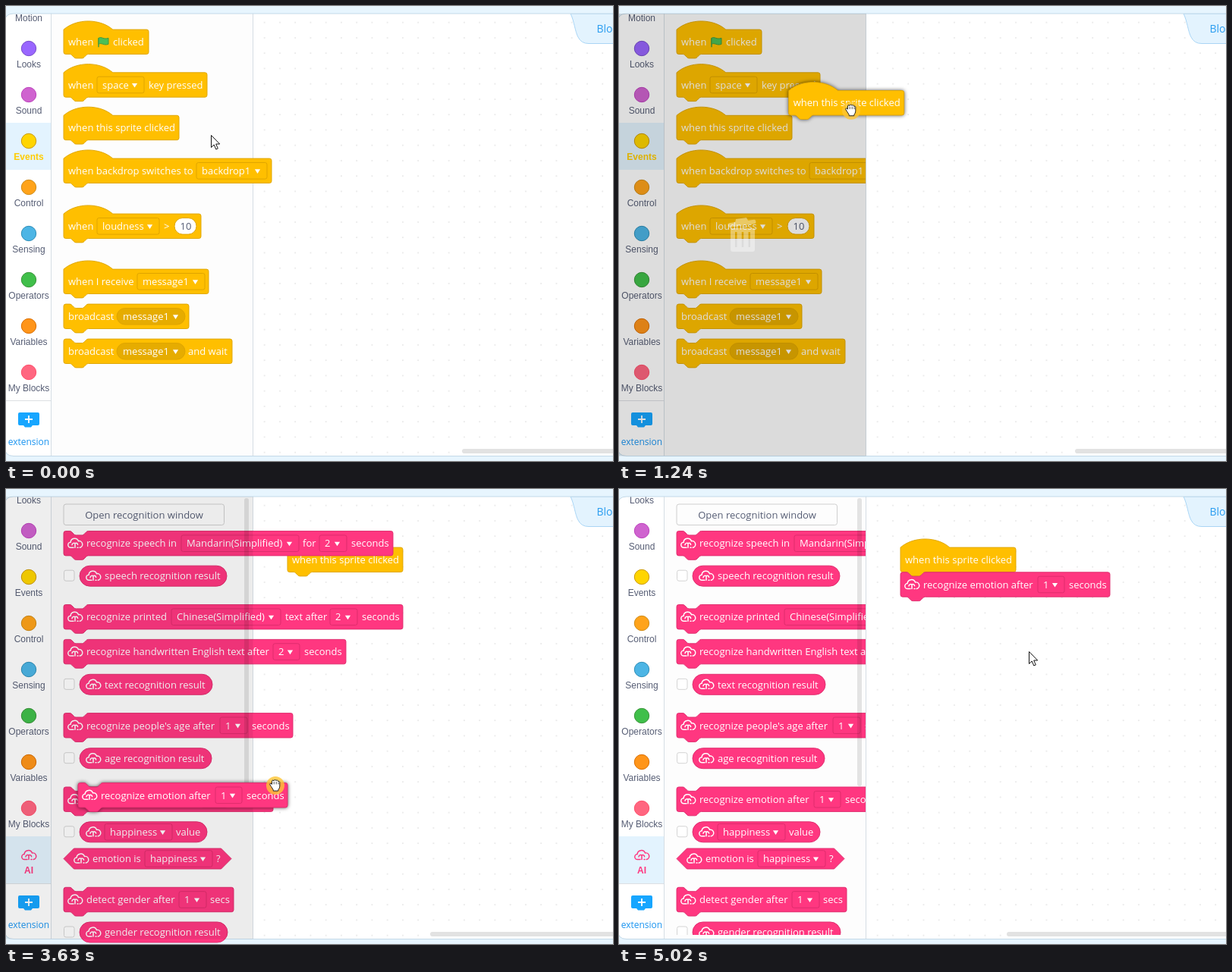
Animation of 800 by 600 pixels, one loop 5.38 s. Source, as an HTML page:

```html
<!DOCTYPE html>
<html lang="en">
<head>
<meta charset="utf-8">
<title>Block editor</title>
<style>
html, body { margin: 0; width: 100%; height: 100%; overflow: hidden; background: #e7f5fe; }
svg { display: block; width: 100vw; height: 100vh; }
text { font: 13px "Open Sans", "Noto Sans", sans-serif; white-space: pre; }
.block text { fill: #fff; font-weight: 500; }
.block .value { fill: #575e75; }
.side { font: 12px "Liberation Sans", Arial, sans-serif; fill: #575e75; text-anchor: middle; }
.lifted { filter: drop-shadow(0 0 2.5px rgba(0, 0, 0, .65)); }
</style>
</head>
<body>
<svg id="stage" viewBox="0 0 800 600" xmlns="http://www.w3.org/2000/svg"></svg>
<script>
const LOOP = 5380;
const YELLOW = { fill: '#ffbf00', line: '#dfa500', dark: '#e6ac00' };
const PINK = { fill: '#ff3780', line: '#df2c6d', dark: '#e6306f' };
const stage = document.getElementById('stage');

// Block outlines, in block units scaled to the editor zoom
const ZOOM = 0.675;
const NOTCH_TOP = 'H12c2 0 3 1 4 2l4 4c1 1 2 2 4 2h12c2 0 3-1 4-2l4-4c1-1 2-2 4-2';
const NOTCH_BOTTOM = 'H48c-2 0-3 1-4 2l-4 4c-1 1-2 2-4 2h-12c-2 0-3-1-4-2l-4-4c-1-1-2-2-4-2';
const HAT_TOP = 'M0 0c25-22 71-22 96 0';
const STACK_TOP = 'M0 4A4 4 0 0 1 4 0' + NOTCH_TOP;

function outline(shape, width) {
  const w = width / ZOOM;
  if (shape === 'pill') return `M20 0H${w - 20}a20 20 0 0 1 0 40H20a20 20 0 0 1 0-40z`;
  if (shape === 'hex') return `M20 0H${w - 20}l20 20l-20 20H20L0 20z`;
  const top = shape === 'hat' ? HAT_TOP : STACK_TOP;
  return `${top}H${w - 4}a4 4 0 0 1 4 4v40a4 4 0 0 1-4 4${NOTCH_BOTTOM}H4a4 4 0 0 1-4-4z`;
}

const label = (x, str, cls = '') => `<text x="${x}" y="4.7" class="${cls}">${str}</text>`;
const arrow = x => `<path d="M${x - 3.6}-2h7.2l-3.6 5.6z" fill="#fff"/>`;
const cloud = (x, y, color) => `<g transform="translate(${x} ${y})" fill="none" stroke="${color}"
  stroke-width="1.5" stroke-linecap="round"><path d="M-2 5.5H-5.5a3.5 3.5 0 0 1-.4-7a5.4 5.4 0 0 1 10.4-1.5
  a4.3 4.3 0 0 1 1.8 8.5"/><path d="M-4 2a2.6 2.6 0 0 1 4-2v5.5M0 0a2.3 2.3 0 0 1 3.6 1.8M3 5.5h1"/></g>`;
const flag = x => `<path d="M${x} -5v12" stroke="#45993d" stroke-width="1.5"/>
  <path d="M${x}-5c4-2.5 7 2.5 13 0v8c-6 2.5-9-2.5-13 0z" fill="#4cbf56" stroke="#45993d"/>`;

function field(x1, x2, str, c, round) {
  return `<rect x="${x1}" y="-10.8" width="${x2 - x1}" height="21.6" rx="${round ? 10.8 : 2.5}"
    fill="${round ? c.dark : c.fill}" stroke="${c.line}"/>` + label(x1 + (round ? 8 : 7), str) + arrow(x2 - 12.5);
}

// A part is a label [x, text], a menu [x1, x2, text, round?] or ready markup
function block(shape, x, y, width, c, ...parts) {
  const half = shape === 'pill' || shape === 'hex' ? 13.5 : 16.2;
  const inner = parts.map(p => typeof p === 'string' ? p
    : p.length === 2 ? label(...p) : field(p[0], p[1], p[2], c, p[3])).join('');
  return `<g class="block" transform="translate(${x} ${y})"><path d="${outline(shape, width)}"
    transform="translate(0 ${-half}) scale(${ZOOM})" fill="${c.fill}" stroke="${c.line}"
    stroke-width="1.4"/>${inner}</g>`;
}

const hat = (y, w, ...parts) => block('hat', 76, y, w, YELLOW, ...parts);
const cast = (y, w, ...parts) => block('stack', 76, y, w, YELLOW, [6, 'broadcast'], [70, 160, 'message1', true], ...parts);
const icon = x => cloud(x, 0, '#fff');
const command = (y, w, ...parts) => block('stack', 76, y, w, PINK, icon(15), ...parts);
const reporter = (y, right, ...parts) =>
  `<rect x="76.5" y="${y - 7.5}" width="13.5" height="14" rx="2.5" fill="#fff" stroke="#d4d4d4"/>`
  + block('pill', 97, y, right - 97, PINK, icon(18), ...parts);

const eventBlocks = [
  hat(47.3, 112, [6, 'when'], flag(46), [65, 'clicked']),
  hat(104, 189, [6, 'when'], [44, 106, 'space'], [112, 'key pressed']),
  hat(160.5, 152, [6, 'when this sprite clicked']),
  hat(217.3, 274, [6, 'when backdrop switches to'], [175, 268, 'backdrop1']),
  hat(290.3, 181, [6, 'when'], [44, 126, 'loudness'], [132, '&gt;'],
    `<rect x="146" y="-10.8" width="29" height="21.6" rx="10.8" fill="#fff" stroke="${YELLOW.line}"/>`
    + label(153.5, '10', 'value')),
  hat(363.3, 191, [6, 'when I receive'], [97, 186, 'message1']),
  cast(409.3, 165),
  cast(455.3, 222, [164, 'and wait'])
].join('');

const aiBlocks = [
  `<rect x="76" y="20" width="211.5" height="27.5" rx="3" fill="#fdfdfd" stroke="#cfcfcf"/>
   <text x="182" y="39" text-anchor="middle" fill="#575e75">Open recognition window</text>`,
  command(71.7, 434, [30, 'recognize speech in'], [155, 310, 'Mandarin(Simplified)'], [315, 'for'], [337, 373, '2'], [379, 'seconds']),
  reporter(114.7, 291, [33, 'speech recognition result']),
  command(168.7, 447, [30, 'recognize printed'], [142, 286, 'Chinese(Simplified)'], [292, 'text after'], [351, 387, '2'], [393, 'seconds']),
  command(214.6, 372, [30, 'recognize handwritten English text after'], [276, 311, '2'], [317, 'seconds']),
  reporter(257.8, 272, [33, 'text recognition result']),
  command(311.8, 302, [30, "recognize people's age after"], [206, 242, '1'], [248, 'seconds']),
  reporter(355.2, 271, [33, 'age recognition result']),
  command(409.2, 276, [30, 'recognize emotion after'], [181, 216, '1'], [222, 'seconds']),
  reporter(452.3, 265, [33, 122, 'happiness'], [127, 'value']),
  block('hex', 76, 487.5, 221, PINK, icon(23), [38, 'emotion is'], [107, 196, 'happiness'], [201, '?']),
  command(541.5, 224, [30, 'detect gender after'], [152, 188, '1'], [193, 'secs']),
  reporter(584.5, 292, [33, 'gender recognition result']),
  '<rect x="314" y="12" width="6" height="380" rx="3" fill="#000" opacity=".1"/>'
].join('');

const categories = [
  ['Motion', '#4c97ff', '#3373cc'], ['Looks', '#9966ff', '#774dcb'], ['Sound', '#cf63cf', '#bd42bd'],
  ['Events', '#ffd500', '#cc9900'], ['Control', '#ffa31a', '#cf8b17'], ['Sensing', '#4cb5e5', '#2e8eb8'],
  ['Operators', '#40bf4a', '#389438'], ['Variables', '#ff951a', '#db6e00'], ['My Blocks', '#ff6680', '#ff4d6a'],
  ['AI', '#ff3780']
];

function sidebar(scroll, selected) {
  return categories.map(([name, fill, line], i) => {
    const y = 56 + 61 * (i - 1) - scroll, on = name === selected;
    const mark = line ? `<circle cx="30" cy="${y}" r="9.7" fill="${fill}" stroke="${line}"/>` : cloud(30, y + 1, fill);
    return (on ? `<rect y="${y - 24}" width="59" height="62" fill="#e3f3fe"/>` : '') + mark
      + `<text class="side" x="30" y="${y + 25}"${on ? ` style="font-weight:bold;fill:${name === 'AI' ? fill : '#ffcc00'}"` : ''}>${name}</text>`;
  }).join('');
}

const trash = `<path fill="#fff" fill-rule="evenodd" d="M147 293h32v28q0 3-3 3h-26q-3 0-3-3z
  M153 298v20h2.5v-20zM161.7 298v20h2.5v-20zM170.5 298v20h2.5v-20z"/>
  <g transform="rotate(-8 162 287)" fill="#fff"><rect x="143.5" y="284" width="37" height="5.5" rx="2"/>
  <path d="M153 285l2-5h14l2 5z"/></g>`;

const hand = `<path d="M-5.5 1.5l-1.6-2.6q-.6-1.6 1-1.9l1.6 1.4v-4q.2-1.6 1.5-1.4l1.1.8q.2-1.4 1.5-1.3t1.3 1.2
  q.4-.9 1.6-.6t1.2 1.5q1.8-.6 2.1 1v5.5q-.3 3-2 4.6v1.4h-6.6v-1.5z" fill="#fff" stroke="#222" stroke-width="1"/>
  <path d="M-1.8-5v3.4M1.2-5v3.4M4-4.4v2.8" stroke="#222" stroke-width=".8"/>`;

const panel = 'M800 10H10Q-2 10-2 22V581Q-2 593.5 10 593.5H800';
stage.innerHTML = `
<defs>
  <pattern id="dots" x="331" y="12" width="20.25" height="20.25" patternUnits="userSpaceOnUse">
    <rect x="9" y="9" width="1.4" height="1.4" fill="#dadada"/></pattern>
  <clipPath id="panelClip"><path d="${panel}z"/></clipPath>
  <clipPath id="sideClip"><rect y="10" width="60" height="510"/></clipPath>
  <clipPath id="flyoutClip"><rect id="flyoutBox" x="60" y="10" height="578"/></clipPath>
</defs>
<rect width="800" height="600" fill="#e7f5fe"/>
<g clip-path="url(#panelClip)">
  <rect y="10" width="800" height="584" fill="#fff"/>
  <rect x="326" y="10" width="474" height="584" fill="url(#dots)"/>
  <rect x="60" y="10" width="265" height="584" fill="#fdfdfd"/>
  <path d="M744 10C749 20 750 34 754 41Q758 49.500 768 49.500H801V10z" fill="#e3f3fe" stroke="#a9d5f5"/>
  <rect id="scrollbar" y="584" width="400" height="6" rx="3" fill="#e2e2e2"/>
  <path d="M59.500 10V594M325.500 10V594" stroke="#d5dde4"/>
  <g clip-path="url(#sideClip)"><g id="eventSide">${sidebar(0, 'Events')}</g><g id="aiSide">${sidebar(62, 'AI')}</g></g>
  <path d="M0 520.500H59" stroke="#dcdfe3"/>
  <path d="M18 536H42q2 0 2 2V551q0 2-2 2H35l-2 2.500H25l-2-2.500H18q-2 0-2-2V538q0-2 2-2z" fill="#17a6ff"/>
  <path d="M25 545H35M30 540V550" stroke="#fff" stroke-width="1.800"/>
  <text x="30" y="579" text-anchor="middle" fill="#1a94f0" style="font-size:12px">extension</text>
</g>
<text x="778.500" y="35" fill="#2a9df0" style="font-size:14px">Blocks</text>
<path d="${panel}" fill="none" stroke="#c3d9e8"/>
<g id="placedHat">${block('hat', 0, 0, 152, YELLOW, [6, 'when this sprite clicked'])}</g>
<g clip-path="url(#flyoutClip)"><g id="events">${eventBlocks}</g><g id="ai">${aiBlocks}</g></g>
<rect id="shade" y="10" width="325.500" height="583.500"/>
<g id="trash">${trash}</g>
<g id="dragHat" class="lifted">${block('hat', 0, 0, 152, YELLOW, [6, 'when this sprite clicked'])}</g>
<g id="command">${block('stack', 0, 0, 276, PINK, icon(15), [30, 'recognize emotion after'], [181, 216, '1'], [222, 'seconds'])}</g>
<g id="cursor">
  <g id="hand"><circle id="press" r="12" fill="#ffc533" opacity=".8"/>${hand}</g>
  <path id="arrow" d="M.5.5v16l3.700-3.500l2.600 6l2.500-1.100l-2.600-5.900h5z" fill="#fff" stroke="#111"/>
</g>`;

const el = {};
stage.querySelectorAll('[id]').forEach(node => { el[node.id] = node; });

// The screen refreshes only at these moments: [first, last, count]
const refreshes = [
  [190, 660, 6], [740, 950, 3], [1170, 1490, 6], [1690, 1970, 4], [2170, 2170, 1], [2320, 2780, 6],
  [2880, 3340, 6], [3590, 3630, 2], [3710, 4090, 5], [4180, 4460, 4], [4740, 5020, 4]
].flatMap(([a, b, n]) => Array.from({ length: n }, (_, i) => a + (n > 1 ? i * (b - a) / (n - 1) : 0)));
const snap = t => refreshes.reduce((last, r) => r <= t + 0.5 ? r : last, 0);

const cursorPath = [
  [0, 270, 170], [100, 270, 170], [660, 147, 168], [740, 165, 166], [950, 235, 157], [1106, 238, 156],
  [1490, 442, 101], [1690, 441, 112], [1970, 432, 163], [2170, 60, 470], [2320, 78, 460], [2780, 280, 380],
  [3340, 225, 419], [3590, 270, 410], [3630, 355, 391], [3710, 400, 360], [4090, 528, 232],
  [4460, 520, 139], [4740, 523, 155], [5020, 540, 214]
];
const hatPath = [[740, 82, 159], [845, 105, 154], [950, 141, 147.3], [1106, 150, 145], [1490, 371, 93.3]];
const commandPath = [[3590, 78, 408], [3630, 95, 403.8], [3710, 165, 370], [4090, 361.5, 240.3],
  [4300, 376, 180], [4460, 370.5, 131]];
const shadePath = [[690, 0], [740, .04], [845, .14], [950, .2], [1170, .2], [1362, 0],
  [3570, 0], [3630, .065], [3710, .09], [3900, 0]];

function along(path, t) {
  const i = path.findIndex(k => k[0] > t);
  if (i === 0) return path[0].slice(1);
  if (i < 0) return path[path.length - 1].slice(1);
  const a = path[i - 1], b = path[i], p = (t - a[0]) / (b[0] - a[0]);
  return a.slice(1).map((v, j) => v + (b[j + 1] - v) * p);
}

const within = (t, a, b) => t >= a && t < b;
const show = (node, on) => node.setAttribute('display', on ? 'inline' : 'none');
const place = (node, [x, y]) => node.setAttribute('transform', `translate(${x} ${y})`);

function draw(time) {
  const t = snap(time), ai = t >= 2170;
  show(el.events, !ai); show(el.eventSide, !ai);
  show(el.ai, ai); show(el.aiSide, ai);
  el.scrollbar.setAttribute('x', t < 1690 ? 601 : t < 4740 ? 559 : 511);

  // Long blocks spill over the workspace while the palette is hovered
  const spill = t < 800 || within(t, 2320, 3700);
  el.flyoutBox.setAttribute('width', spill ? 740 : 265);
  el.flyoutBox.setAttribute('height', within(t, 3590, 3700) ? 590 : spill ? 583.5 : 578);

  const [shade] = along(shadePath, t);
  el.shade.setAttribute('opacity', shade);
  el.trash.setAttribute('opacity', Math.max(0, (shade - .09) / .11));

  show(el.dragHat, within(t, 740, 1690));
  place(el.dragHat, along(hatPath, t));
  show(el.placedHat, t >= 1690);
  place(el.placedHat, [371, 93.3]);
  show(el.command, t >= 3590);
  place(el.command, t < 4740 ? along(commandPath, t) : [371, 126]);
  el.command.setAttribute('class', t < 4740 ? 'lifted' : '');

  const pos = along(cursorPath, t), pressed = within(t, 740, 1690) || within(t, 3590, 4740);
  const grabbing = pressed || within(t, 400, 740) || within(t, 3060, 3590);
  place(el.cursor, pos);
  show(el.hand, grabbing); show(el.press, pressed); show(el.arrow, !grabbing);
}

function tick(now) {
  draw(now % LOOP);
  requestAnimationFrame(tick);
}
draw(0);
requestAnimationFrame(tick);
</script>
</body>
</html>
```
